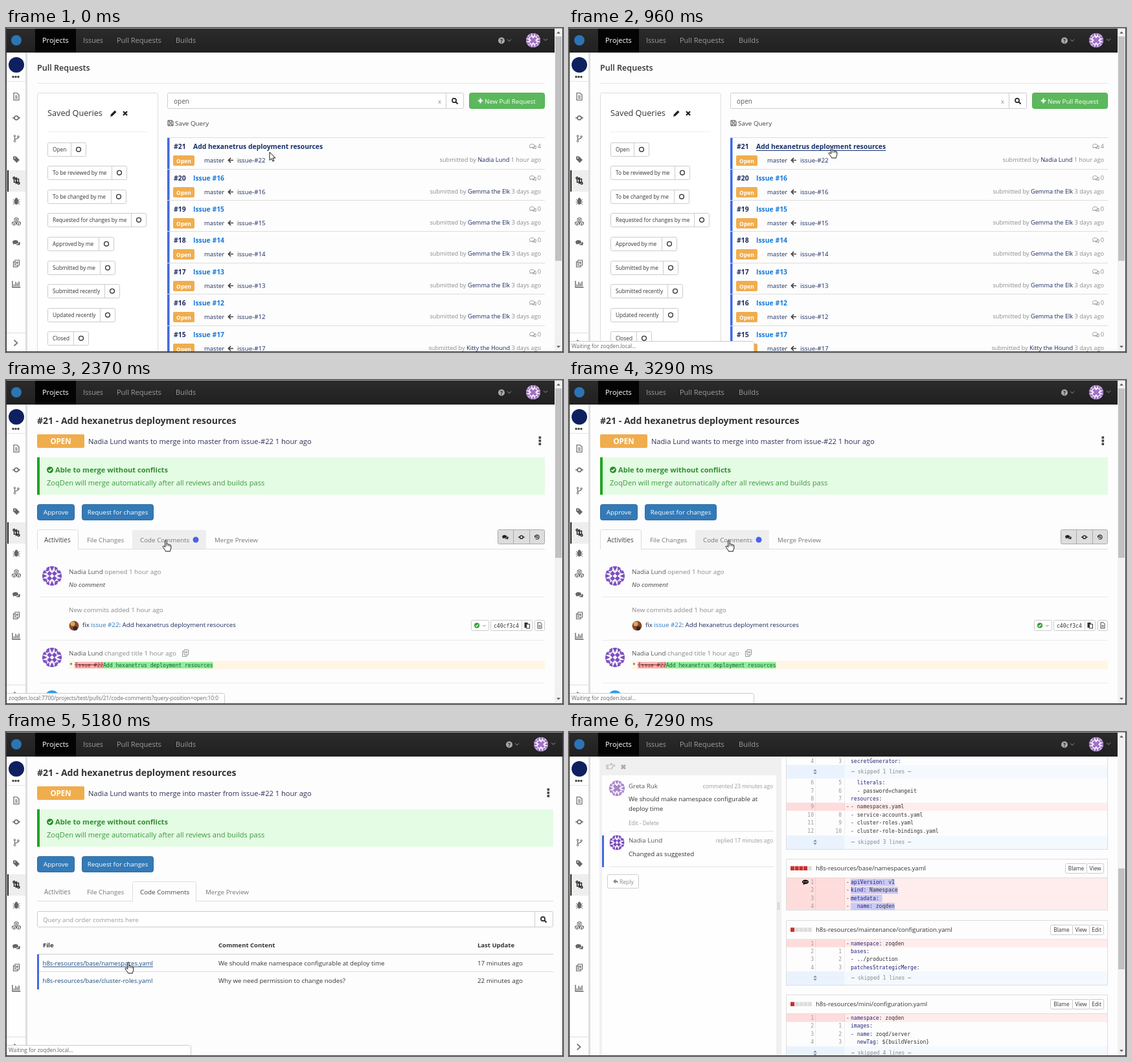
Recreate the animation shown at these times as an HTML page with a canvas. Size 860 by 501 pixels, loop 8000 ms.

```html
<!DOCTYPE html>
<html lang="en">
<head>
<meta charset="utf-8">
<title>Pull request review</title>
<style>
html, body { margin: 0; width: 100%; height: 100%; overflow: hidden; background: #fdfdfd; }
canvas { display: block; width: 860px; height: 501px; }
</style>
</head>
<body>
<canvas id="stage" width="860" height="501"></canvas>
<script>
const c = document.getElementById('stage').getContext('2d');
const LOOP = 8000, TAU = Math.PI * 2;
const SANS = '"Open Sans", "Noto Sans", sans-serif';
const MONO = '"DejaVu Sans Mono", monospace';
const INK = '#333', NAVY = '#1c2b5e', GRAY = '#8a8a8a', LINE = '#ddd', BLUE = '#4169e1';

// ---- drawing helpers ----
function box(x, y, w, h, color) {
  c.fillStyle = color;
  c.fillRect(x, y, w, h);
}
function round(x, y, w, h, r, fill, stroke) {
  c.beginPath();
  c.roundRect(x, y, w, h, r);
  if (fill) { c.fillStyle = fill; c.fill(); }
  if (stroke) { c.strokeStyle = stroke; c.lineWidth = 1; c.stroke(); }
}
function disc(x, y, r, color) {
  c.beginPath();
  c.arc(x, y, r, 0, TAU);
  c.fillStyle = color;
  c.fill();
}
function ring(x, y, r, color, width = 1) {
  c.beginPath();
  c.arc(x, y, r, 0, TAU);
  c.strokeStyle = color;
  c.lineWidth = width;
  c.stroke();
}
function text(s, x, y, size, color = INK, style = '', align = 'left', family = SANS) {
  c.font = `${style} ${size}px ${family}`;
  c.textAlign = align;
  c.fillStyle = color;
  c.fillText(s, x, y);
  return c.measureText(s).width;
}
function runs(parts, x, y, size, style) {
  for (const [s, color] of parts) x += text(s, x, y, size, color, style);
  return x;
}
function runsRight(parts, right, y, size) {
  c.font = ` ${size}px ${SANS}`;
  runs(parts, right - c.measureText(parts.map(p => p[0]).join('')).width, y, size, '');
}
const mono = (s, x, y, color = INK, align) => text(s, x, y, 8.06, color, '', align, MONO);
function shape(d, x, y, stroke, fill, width = 1.2) {
  const p = new Path2D(d);
  c.save();
  c.translate(x, y);
  if (fill) { c.fillStyle = fill; c.fill(p); }
  if (stroke) { c.strokeStyle = stroke; c.lineWidth = width; c.stroke(p); }
  c.restore();
}
function button(label, x, y, w, h, size = 8.3, color = INK) {
  round(x + .5, y + .5, w, h, 2, '#fff', '#ccc');
  text(label, x + w / 2 + .5, y + h / 2 + size * .37 + .5, size, color, '', 'center');
}
function blueButton(label, x, w) {
  round(x + .5, 192.5, w - 1, 24, 3, '#337ab7', '#2e6da4');
  text(label, x + w / 2, 208, 9.85, '#fff', '', 'center');
}
function avatar(x, y, r, color, turn) {
  c.save();
  c.beginPath();
  c.arc(x, y, r, 0, TAU);
  c.clip();
  box(x - r, y - r, r * 2, r * 2, '#f6f2fb');
  c.translate(x, y);
  c.scale(r / 4, r / 4);
  c.fillStyle = color;
  for (let i = 0; i < 4; i++) {
    c.fill(new Path2D('M-1-4L0-2L1-4ZM1-4L2.6-3.4L1.2-2ZM-1-4L-2.6-3.4L-1.2-2ZM-1-2L0-1L1-2L2-1L1 0L0-1L-1 0L-2-1ZM2-3L3-2L2-1.4Z'));
    c.rotate(Math.PI / 2);
  }
  if (turn) { c.rotate(Math.PI / 4); c.fillRect(-.8, -.8, 1.6, 1.6); }
  c.restore();
}

// ---- icons ----
const CROSS = 'M-3-3L3 3M3-3L-3 3';
const DOC = 'M-4-5.5h5l3 3v8h-8zM-2-1h4M-2 1h4M-2 3h4';
const COMMIT = 'M-6 0h3M3 0h3M3 0a3 3 0 1 1-6 0a3 3 0 1 1 6 0';
const BUBBLES = 'M-1.5-4C-4.5-4-6-2.5-6-1C-6 0-5.4.8-4.8 1.2L-5.4 2.8L-2.8 1.9C1 2.2 3 .8 3-1C3-2.8 1-4-1.5-4ZM4-1.5C5.5-1 6 .2 6 1C6 2 5.5 2.5 5 2.8L5.5 4.3L3 3.5C1.5 3.8 0 3.6-1 2.8C2 2.8 4 1 4-1.5Z';
const ARROW_LEFT = 'M4 0H-3M0-3.6L-3.6 0L0 3.6';
const PLUS_DOC = 'M-2-5h6.5v8h-6.5zM-2-2.5h-2.5v8h6.5v-2.5M1.2-3.2v4.4M-1-1h4.4';
const CHEVRON = 'M-3-1.5L0 1.5L3-1.5';

function magnifier(x, y) {
  ring(x - 1, y - 1, 3.1, '#222', 1.6);
  shape('M1.4 1.4L4.5 4.5', x, y, '#222', null, 2);
}
function sidebar() {
  box(0, 38, 30, 463, '#fefefe');
  box(30, 38, 3, 463, '#dedede');
  disc(16, 57, 12, '#0f2060');
  for (const x of [11, 15, 19]) disc(x, 75.5, 1.7, '#444');
  box(1, 82, 29, 1, '#e4e4e4');
  box(1, 220, 29, 33, '#eee');
  box(2, 220, 2, 33, '#222');
  const g = '#666';
  shape(DOC, 16, 106, g);
  shape(COMMIT, 16, 139, g, null, 1.6);
  shape('M-2.5-3v6M3-2c0 3-5.5 2-5.5 4', 16, 171, g);
  for (const [x, y] of [[13.5, 167], [13.5, 175], [19, 168]]) ring(x, y, 1.3, g);
  shape('M-5-4.5h4.5l5.5 5.5-4.5 4.5-5.5-5.5z', 16, 203, null, g);
  disc(13.5, 201, 1, '#fff');
  shape('M-3.5-2v4.5h4.5M3.5 2v-4.5h-4.5M1-5L-1.5-2.5L1 0M-1 5L1.5 2.5L-1 0', 16, 236, '#222', null, 1.4);
  for (const [x, y] of [[12.5, 232], [19.5, 240]]) ring(x, y, 1.5, '#222', 1.4);
  shape('M-3-1a3 3.5 0 0 1 6 0v2a3 4 0 0 1-6 0zM-2-3.5a2 2 0 0 1 4 0z', 16, 268, null, g);
  shape('M-5-3l2 2M5-3l-2 2M-5.5 1h11M-5 5l2-2M5 5l-2-2', 16, 268, g, null, 1);
  for (const [x, y] of [[16, 296], [12.5, 302], [19.5, 302]])
    shape('M0-3L3-1.5V1.5L0 3L-3 1.5V-1.5ZM-3-1.5L0 0L3-1.5M0 0V3', x, y, g, null, 1);
  shape(BUBBLES, 16, 332, null, g);
  shape(PLUS_DOC, 16, 364, g);
  shape('M-6-5v10h12.5M-3.5 3.5v-3M-1 3.5v-7M1.5 3.5v-5M4 3.5v-7.5', 16, 396, g, null, 1.4);
  box(1, 471, 29, 1, LINE);
  shape('M-2.5-4.5L2.5 0L-2.5 4.5', 15, 487, '#777', null, 1.7);
}
function header(right) {
  const g = c.createLinearGradient(0, 1, 0, 38);
  g.addColorStop(0, '#2b2b2b');
  g.addColorStop(1, '#202020');
  box(1, 1, right - 1, 37, g);
  box(45, 1, 63, 37, '#040404');
  disc(16, 19, 8, '#2d74b5');
  text('Projects', 56, 23, 11, '#fff');
  text('Issues', 119, 23, 10.7, '#9d9d9d');
  text('Pull Requests', 171, 23, 11, '#9d9d9d');
  text('Builds', 262, 23, 10.9, '#9d9d9d');
  disc(right - 82, 19.5, 5, '#aaa');
  text('?', right - 82, 22.8, 8.5, '#222', 'bold', 'center');
  shape(CHEVRON, right - 70, 19, '#999', null, 1);
  avatar(right - 33, 19, 11, '#a070c4', true);
  shape(CHEVRON, right - 14, 18, '#999', null, 1);
}
function scrollbar(top, bottom) {
  box(847, 1, 12, 499, '#f1f1f1');
  box(848, top, 10, bottom - top, '#c1c1c1');
  shape('M-3 1.5L0-1.5L3 1.5Z', 853, 7, null, '#555');
  shape('M-3-1.5L0 1.5L3-1.5Z', 853, 493, null, '#555');
}

// ---- pages ----
const PERSON = 'Nadia Lund', TITLE = 'Add hexanetrus deployment resources';
const QUERIES = [['Open', 124], ['To be reviewed by me', 187], ['To be changed by me', 186],
  ['Requested for changes by me', 217], ['Approved by me', 167], ['Submitted by me', 169],
  ['Submitted recently', 176], ['Updated recently', 169], ['Closed', 128]];
const REQUESTS = [22, 16, 15, 14, 13, 12, 17];

function listPage(t) {
  text('Pull Requests', 48, 66, 12.6, INK, '600');
  box(48, 85, 784, 1, '#e4e4e4');
  round(48.5, 100.5, 186, 420, 3, '#fff', LINE);
  text('Saved Queries', 64, 136, 12.7, INK);
  shape('M-5 5L-4 1.5L2-4.5L4.5-2L-1.5 4Z', 166, 132, null, '#222');
  shape(CROSS, 184, 132, '#222', null, 2.3);
  box(64, 160, 155, 1, '#eee');
  QUERIES.forEach(([label, right], i) => {
    const y = Math.round(176.5 + i * 36.6);
    round(64.5, y + .5, right - 65, 21, 2, '#fff', '#ccc');
    box(right - 24, y, 1, 22, '#ccc');
    text(label, 72, y + 14, 8.3);
    ring(right - 12, y + 10.8, 3.4, INK, 1.4);
  });

  round(249.5, 100.5, 457, 24, 2, '#fff', '#ccc');
  box(679, 101, 1, 24, '#ccc');
  text('open', 259, 117, 10, '#555');
  text('x', 667, 116.5, 9.5, '#888');
  magnifier(693, 113);
  round(715.5, 100.5, 116, 24, 3, '#5cb85c', '#4cae4c');
  shape('M-3.7 0H3.7M0-3.7V3.7', 732.5, 112.5, '#fff', null, 2.2);
  text('New Pull Request', 739, 116.5, 9.7, '#fff');
  shape('M-4-4h6.5l1.5 1.5v6.5h-8zM-2-4v3h4v-3M-2 4v-3h4v3', 254, 147, '#444', null, 1);
  text('Save Query', 261, 151, 9.85, '#444');

  REQUESTS.forEach((issue, i) => {
    const y = Math.round(169.3 + i * 48.37), first = i === 0;
    box(249, y, 583, 1, LINE);
    box(249, y + 1, 3.5, 48, BLUE);
    text('#' + (21 - i), 259, y + 18, 10.4, NAVY, 'bold');
    const w = text(first ? TITLE : 'Issue #' + issue, 289, y + 18, 10.4, first ? '#15306e' : '#1779d8', 'bold');
    if (first && t >= 250) box(289, y + 20, w, 1, '#15306e');
    round(258, y + 28, 33, 16, 2, '#f0ad4e');
    text('Open', 274.5, y + 39.5, 8.5, '#fff', 'bold', 'center');
    text('master', 306, y + 38.5, 9.5, NAVY);
    shape(ARROW_LEFT, 347, y + 35.5, '#444', null, 1.7);
    text('issue-#' + issue, 357, y + 38.5, 9.7, NAVY);
    c.save();
    c.translate(813.5, y + 14);
    c.scale(.85, .85);
    shape(BUBBLES, 0, 0, '#888', null, 1);
    c.restore();
    text(first ? '4' : '0', 826, y + 17, 9.2, GRAY, '', 'right');
    const who = first ? PERSON : i === 6 ? 'Kitty the Hound' : 'Gemma the Elk';
    runsRight([['submitted by ', GRAY], [who, NAVY], [first ? ' 1 hour ago' : ' 3 days ago', GRAY]], 826, y + 38, 9.2);
  });
  scrollbar(13, 360);
}

function requestTop(right) {
  text('#21 - ' + TITLE, 48, 68, 14.05, INK, 'bold');
  round(48, 84, 73, 21, 2, '#f0ad4e');
  text('OPEN', 84.5, 98.8, 11.5, '#fff', 'bold', 'center');
  text(PERSON + ' wants to merge into master from issue-#22 1 hour ago', 127, 99, 11.1, '#2b2f55');
  for (const y of [89, 94, 99]) box(right - 9.5, y - 1.8, 3.6, 3.6, '#444');
  box(48, 119.5, right - 48, 58, '#e4fbe4');
  box(48, 119.5, 4, 58, '#1fa51f');
  disc(68, 139, 5, '#2a902a');
  shape('M-2.5 0L-.7 1.8L2.6-1.7', 68, 139, '#fff', null, 1.5);
  text('Able to merge without conflicts', 76, 143, 11.1, '#2f8f2f', 'bold');
  text('ZoqDen will merge automatically after all reviews and builds pass', 63, 163, 11.1, '#3c9a3c');
  blueButton('Approve', 48, 58);
  blueButton('Request for changes', 117, 111);
}
function tabs(active, right, previewX) {
  box(48, 261, right - 48, 1, LINE);
  const [x, w] = active ? [195, 99] : [48, 64];
  round(x + .5, 231.5, w - 1, 32, [3, 3, 0, 0], '#fdfdfd', LINE);
  box(x - 1, 262, w + 2, 4, '#fdfdfd');
  text('Activities', 59, 251, 9.9, active ? '#777' : '#444');
  text('File Changes', 125, 251, 9.8, '#777');
  text('Code Comments', 207, 251, 9.8, active ? '#444' : '#777');
  text('Merge Preview', previewX, 251, 9.8, '#777');
}
function activityPage(cursor) {
  requestTop(832);
  tabs(0, 832, 322);
  if (cursor.x > 195 && cursor.x < 309 && cursor.y > 231) {
    box(195, 232, 114, 29, '#eee');
    text('Code Comments', 207, 251, 9.8, '#777');
  }
  disc(293, 247, 4.5, '#4a62ea');
  round(759.5, 231.5, 72, 22, 2, '#ddd', '#aaa');
  box(783, 232, 1, 22, '#aaa');
  box(808, 232, 1, 22, '#aaa');
  c.save();
  c.translate(771, 243);
  c.scale(.8, .8);
  shape(BUBBLES, 0, 0, null, '#222');
  shape(COMMIT, 31, 0, '#222', null, 1.8);
  shape('M-4-3v3h3M-3.8-.5a4 4 0 1 1 1 3M0-2.5v3h2', 61, 0, '#222', null, 1.4);
  c.restore();

  avatar(71, 303, 15, '#7c4fc0');
  runs([[PERSON, '#555'], [' opened 1 hour ago', GRAY]], 97, 300, 9.85, '');
  text('No comment', 97, 320, 9.85, '#444', 'italic');
  box(51, 335, 781, 1, '#eaeaea');
  text('New commits added 1 hour ago', 97, 359, 9.8, GRAY);
  disc(105, 380, 7.5, '#8a4a2b');
  disc(103, 377, 3.5, '#e0a35c');
  disc(107, 384, 3.2, '#33242c');
  runs([['fix ', NAVY], ['issue #22', '#2d78c5'], [': ' + TITLE, NAVY]], 118, 382, 9.72, '');
  round(718.5, 371.5, 27, 16, 2, '#fff', '#ccc');
  disc(727, 379.5, 4, '#2f9a2f');
  shape('M-2 0L-.5 1.5L2-1.5', 727, 379.5, '#fff');
  shape('M-2-1L0 1L2-1', 738.5, 380, '#777', null, 1);
  round(748.5, 371.5, 64, 16, 2, '#fff', '#ccc');
  mono('c40cf3c4', 753, 382.5);
  box(796, 372, 1, 16, '#ccc');
  box(800.5, 375, 5, 8, '#333');
  round(803.5, 377.5, 5, 6.5, 0, '#fff', '#333');
  round(816.5, 371.5, 15, 16, 2, '#fff', '#ccc');
  shape('M-3-4.5h4l2 2v7h-6zM-1.5 0h3M-1.5 2h3', 824, 379.5, '#444', null, 1);
  box(51, 402, 781, 1, '#eaeaea');
  avatar(71, 429, 15, '#7c4fc0');
  runs([[PERSON, '#555'], [' changed title 1 hour ago', GRAY]], 97, 426, 9.8, '');
  shape(PLUS_DOC, 277, 422, '#888', null, .9);
  box(97, 434, 735, 13, '#fff6e5');
  mono('*', 98, 444);
  box(106, 436, 44, 10, '#ffb3b3');
  box(150, 436, 169.5, 10, '#8ff09a');
  mono('Issue #22', 106.5, 443.5, '#7a3434');
  box(106, 440, 44, 1, '#7a3434');
  mono(TITLE, 150, 443.5, '#155a2a');
  box(51, 468, 781, 1, '#eaeaea');
  disc(71, 491, 11, '#2f9be8');
  scrollbar(13, 275);
}
function commentsPage(t) {
  requestTop(845);
  tabs(1, 845, 308);
  round(48.5, 277.5, 796, 24, 2, '#fff', '#ccc');
  box(816, 278, 1, 24, '#ccc');
  text('Query and order comments here', 57, 293.5, 9.65, '#999');
  magnifier(830, 290);
  text('File', 57, 333, 9.5, INK, 'bold');
  text('Comment Content', 328, 333, 9.5, INK, 'bold');
  text('Last Update', 728, 333, 9.5, INK, 'bold');
  box(48, 343, 797, 1, '#ccc');
  box(48, 370, 797, 1, LINE);
  box(48, 344, 3, 54, BLUE);
  const rows = [['namespaces', 'We should make namespace configurable at deploy time', 17],
    ['cluster-roles', 'Why we need permission to change nodes?', 22]];
  rows.forEach(([file, note, age], i) => {
    const y = 361 + i * 27;
    const w = text(`h8s-resources/base/${file}.yaml`, 56.5, y, 9.58, '#1c4a80');
    if (!i && t >= 3960) box(56.5, y + 1.5, w, 1, '#1c4a80');
    text(note, 328, y, 9.75);
    text(age + ' minutes ago', 728, y, 9.75);
  });
}

const ROW = 12.4, KEY = '#23237c';
function skipRow(y, n) {
  box(336, y, 496, 21, '#f4f9ff');
  box(336, y, 89, 21, '#eaf3fd');
  shape('M-2.8-1L0-4L2.8-1ZM-2.8 1L0 4L2.8 1Z', 380, y + 10.5, null, '#7590ad');
  mono(`┅ skipped ${n} lines ┅`, 436, y + 13, '#8a8a8a');
}
function codeRow(y, before, after, code, selected) {
  const gone = after === '';
  box(336, y, 496, ROW + .2, gone ? '#ffecec' : '#fdfdfd');
  if (gone) box(336, y, 89, ROW + .2, '#ffdcdc');
  box(380, y, 1, ROW, gone ? '#f3cccc' : '#eee');
  box(425, y, 1, ROW, gone ? '#f3cccc' : '#eee');
  if (selected) box(435, y + 1, code.length * 4.86, ROW - 1.5, '#c9c9f6');
  const base = y + 9;
  mono(before, 378, base, '#999', 'right');
  mono(after, 421, base, '#999', 'right');
  if (gone) mono('-', 428, base);
  const cut = code.indexOf(':') + 1;
  const w = mono(code.slice(0, cut), 435, base, KEY);
  mono(code.slice(cut), 435 + w, base);
}
function fileHead(y, name, red, labels) {
  round(335.5, y + .5, 496, 29, 0, '#fdfdfd', LINE);
  for (let i = 0; i < 5; i++) box(342 + i * 6.7, y + 11.5, 6, 6.5, i < red ? '#c9302c' : '#ddd');
  text(`h8s-resources/${name}.yaml`, 381, y + 18, 9.55);
  const lefts = labels === 2 ? [766, 799] : [743, 777, 803];
  const ends = labels === 2 ? [799, 825] : [777, 803, 825];
  ['Blame', 'View', 'Edit'].slice(0, labels).forEach((s, i) => button(s, lefts[i], y + 7, ends[i] - lefts[i], 15));
}
function frameRows(y, h) {
  box(335, y, 1, h, LINE);
  box(831, y, 1, h, LINE);
  box(335, y + h, 497, 1, LINE);
}
function codePage() {
  box(47, 38, 281, 463, '#f0f0f0');
  box(51, 67, 269, 434, '#fefefe');
  shape('M-6-2h2v6h-2zM-4-2h3l2-2.5 1.5 1-1 1.5h5v2h-3v1h-.5v1.5h-.5v1.5h-6.5z', 64, 53, '#bbb', null, 1.2);
  shape(CROSS, 84, 54, '#aaa', null, 2.8);
  avatar(74, 87, 12, '#a984cc', true);
  text('Greta Ruk', 92, 86.5, 9.75, '#555');
  text('commented 23 minutes ago', 315, 86.5, 8.3, '#999', '', 'right');
  text('We should make namespace configurable at', 92, 107, 9.7);
  text('deploy time', 92, 121.5, 9.7);
  text('Edit - Delete', 92, 143.5, 8.3, '#999');
  box(62, 153, 254, 1, '#e4e4e4');
  box(51, 160, 3, 49, BLUE);
  avatar(74, 171, 11.5, '#7648bd');
  text(PERSON, 92, 171, 9.75, '#555');
  text('replied 17 minutes ago', 315, 171, 8.3, '#999', '', 'right');
  text('Changed as suggested', 92, 191.5, 9.7);
  box(62, 208, 254, 1, '#e4e4e4');
  round(59.5, 220.5, 48, 21, 2, '#fff', '#ccc');
  shape('M-4-.5L0-4V-2C3-2 4 0 3.5 3C3 1 2 .8 0 .8V3Z', 72, 231.5, null, '#888');
  text('Reply', 78, 235, 8.5, '#888');
  for (let i = 0; i < 4; i++) for (const x of [322, 324]) box(x, 264 + i * 3, 1, 1, '#777');

  codeRow(38.5, '4', '3', 'secretGenerator:');
  skipRow(51, 1);
  codeRow(72.2, '6', '5', '  literals:');
  codeRow(84.6, '7', '6', '  - password=changeit');
  codeRow(97, '8', '7', 'resources:');
  codeRow(109.4, '9', '', '- namespaces.yaml');
  ['service-accounts', 'cluster-roles', 'cluster-role-bindings'].forEach((s, i) =>
    codeRow(121.9 + i * ROW, String(10 + i), String(8 + i), `- ${s}.yaml`));
  skipRow(160, 3);
  frameRows(38, 143);

  fileHead(196, 'base/namespaces', 4, 2);
  ['apiVersion: v1', 'kind: Namespace', 'metadata: ', '  name: zoqden'].forEach((s, i) =>
    codeRow(226 + i * ROW, String(i + 1), '', s, true));
  frameRows(226, 49);
  shape('M0-3.5C3-3.5 5-2.2 5-.3S3 3 0 3L-3.5 4.2L-3 2.3C-4.5 1.6-5 .7-5-.3C-5-2.2-3-3.5 0-3.5Z', 365, 232, null, '#111');
  for (const x of [362.5, 365, 367.5]) disc(x, 231.7, .7, '#fff');

  fileHead(291, 'maintenance/configuration', 1, 3);
  ['namespace: zoqden', 'bases:', '- ../production', 'patchesStrategicMerge:'].forEach((s, i) =>
    codeRow(320.5 + i * ROW, String(i + 1), i ? String(i) : '', s));
  skipRow(370, 1);
  frameRows(321, 70);

  fileHead(406, 'mini/configuration', 1, 3);
  ['namespace: zoqden', 'images:', '- name: zoqd/server', '  newTag: ${buildVersion}'].forEach((s, i) =>
    codeRow(436 + i * ROW, String(i + 1), i ? String(i) : '', s));
  skipRow(486, 4);
  frameRows(436, 70);
  scrollbar(211, 367);
}

// ---- status bubble, clicks and pointer ----
const HOST = 'zoqden.local', WAIT = `Waiting for ${HOST}...`;
const PULL = HOST + ':7700/projects/test/pulls/21';
const LINK = PULL + '/code-comments?query-position=open:10:0';
// start, end, text, fade in, fade out
const STATUS = [
  [480, 870, PULL + '?query-position=open:0:0', 80, 0],
  [870, 1590, WAIT, 0, 150],
  [1920, 2290, LINK.slice(0, 64) + '…', 80, 0],
  [2290, 3200, LINK, 0, 0],
  [3200, 4000, WAIT, 0, 120],
  [5080, 5740, WAIT, 80, 150]
];
const clamp = v => Math.max(0, Math.min(1, v));
const ease = v => v * v * (3 - 2 * v);

function status(t) {
  const s = STATUS.find(([from, to]) => t >= from && t < to);
  if (!s) return;
  const [from, to, label, fadeIn, fadeOut] = s;
  const w = label === LINK ? 286 + 52 * clamp((t - 2290) / 80) : 286;
  c.save();
  c.globalAlpha = (fadeIn ? clamp((t - from) / fadeIn) : 1) * (fadeOut ? clamp((to - t) / fadeOut) : 1);
  round(-.5, 484.5, w, 17, [0, 3, 0, 0], '#fff', '#ccc');
  c.clip();
  text(label, 4, 495, 8.3, '#666');
  c.restore();
}

const CLICKS = [[370, 406, 185], [2700, 247, 249], [4590, 189, 357]];
function ripple(t) {
  for (const [at, x, y] of CLICKS) {
    const k = (t - at) / 590;
    if (k > 0 && k < 1) ring(x, y, 3 + 32 * k, `rgba(225,70,70,${.55 * (1 - k)})`, 2);
  }
}

// start, end, destination
const MOVES = [[30, 370, 406, 184], [1180, 1660, 247, 248], [3880, 4000, 189, 356], [7030, 7290, 54, -22]];
function pointer(t) {
  let x = 407, y = 192;
  for (const [from, to, tx, ty] of MOVES) {
    const k = ease(clamp((t - from) / (to - from)));
    x += (tx - x) * k;
    y += (ty - y) * k;
  }
  const hand = (t >= 250 && t < 1180) || (t >= 1560 && t < 5330);
  return { x, y, hand };
}
function drawPointer({ x, y, hand }) {
  if (hand) {
    shape('M-1.3 1C-1.3-.4 1-.4 1 1V6C1.6 5 3.3 5.2 3.5 6.4C4.2 5.7 5.6 6 5.8 7.2C6.5 6.6 7.8 7 7.8 8.3V11.5C7.8 13.5 6.5 14.5 6.3 17H-.5C-.8 15-4.6 11.5-4.8 9.5C-4.7 8.2-3 8.3-1.3 10.5Z', x, y, '#111', '#fff', 1);
    shape('M1 6V9M3.5 6.5V9M5.8 7.3V9.5', x, y, '#111', null, .8);
  } else {
    shape('M0 0V12.5L2.9 9.8L4.9 14.2L6.9 13.3L4.9 9H8.8Z', x, y, '#111', '#fff', 1);
  }
}

function draw(t) {
  const cursor = pointer(t);
  box(0, 0, 860, 501, '#fdfdfd');
  if (t < 1180) listPage(t);
  else if (t < 3590) activityPage(cursor);
  else if (t < 5330) commentsPage(t);
  else codePage();
  header(t >= 3590 && t < 5330 ? 859 : 847);
  sidebar();
  status(t);
  box(0, 0, 860, 1, '#9a9a9a');
  box(0, 0, 1, 501, '#33333d');
  box(859, 0, 1, 501, '#33333d');
  box(0, 500, 860, 1, '#33333d');
  ripple(t);
  drawPointer(cursor);
}
function tick() {
  draw(performance.now() % LOOP);
  requestAnimationFrame(tick);
}
tick();
</script>
</body>
</html>
```
